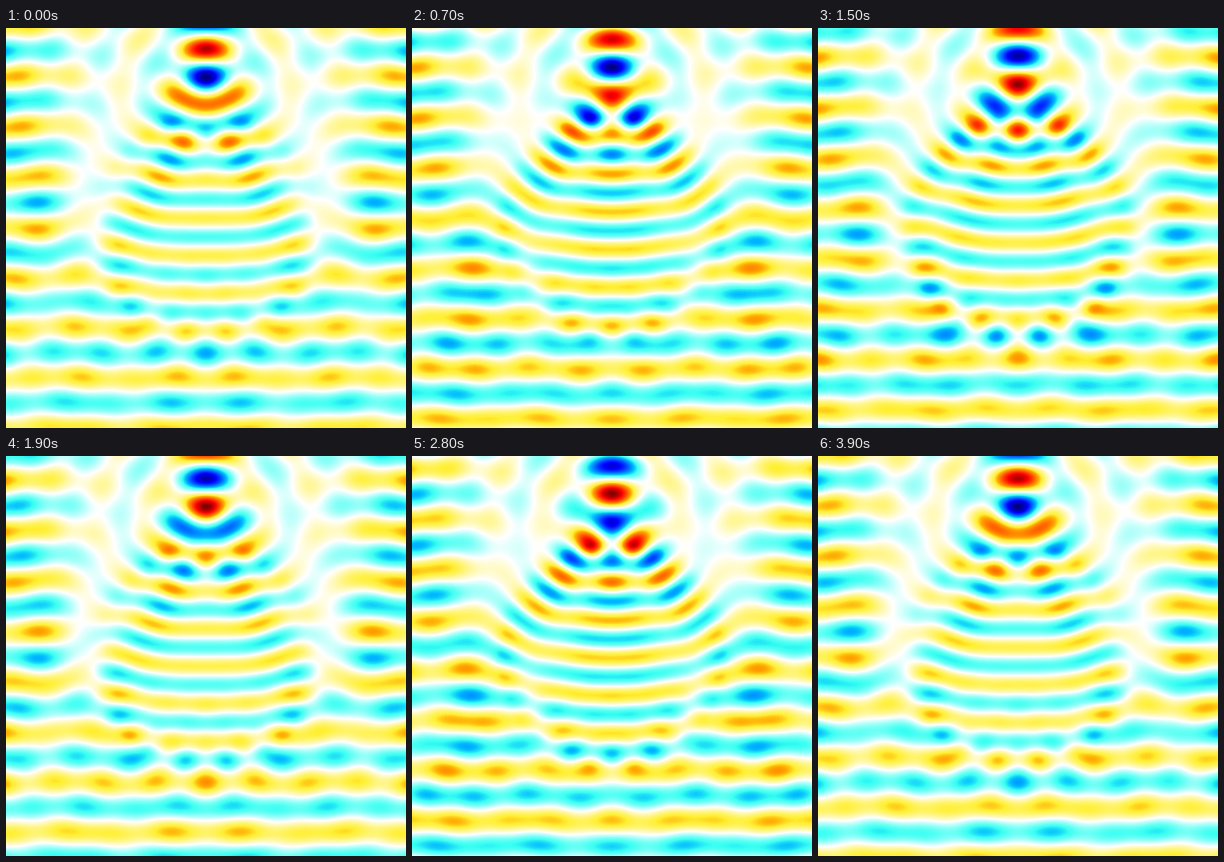
Recreate the animation shown at these times as a matplotlib script. Size 400 by 400 pixels, loop 4000 ms.

```python
import numpy as np
import matplotlib.pyplot as plt
from matplotlib.animation import FuncAnimation
from matplotlib.colors import LinearSegmentedColormap

# Plane wave travelling upwards through a dielectric cylinder,
# electric field along the cylinder axis.
SIZE = 400
FRAMES = 40
WAVELENGTH = 50.0
RADIUS = 115.0
INDEX = 1.33
ORDERS = 28
K = 2 * np.pi / WAVELENGTH


def bessel(x):
    """J_0..J_ORDERS by downward recurrence."""
    upper, current = np.zeros_like(x), np.full_like(x, 1e-60)
    values = [None] * (ORDERS + 1)
    norm = np.zeros_like(x)
    for n in range(60, -1, -1):
        if n % 2 == 0:
            norm += current * (2 if n else 1)
        if n <= ORDERS:
            values[n] = current
        upper, current = current, 2 * n / x * current - upper
    return [v / norm for v in values]


def hankel_start(order, x):
    """Large-argument expansion of the outgoing Hankel function."""
    term = np.ones(x.shape, complex)
    total = term.copy()
    for k in range(1, 17):
        term = term * 1j * (4 * order ** 2 - (2 * k - 1) ** 2) / (8 * k * x)
        total += term
    phase = x - order * np.pi / 2 - np.pi / 4
    return np.sqrt(2 / (np.pi * x)) * np.exp(1j * phase) * total


def hankel(x):
    """H_0..H_ORDERS by upward recurrence."""
    values = [hankel_start(0, x), hankel_start(1, x)]
    for n in range(1, ORDERS):
        values.append(2 * n / x * values[n] - values[n - 1])
    return values


def slope(f, n, x):
    return f[n - 1] - n / x * f[n] if n else -f[1]


def coefficients():
    """Scattered and internal amplitudes of each order."""
    x = np.array([K * RADIUS])
    mx = INDEX * x
    j, jm, h = bessel(x), bessel(mx), hankel(x)
    scattered, internal = [], []
    for n in range(ORDERS + 1):
        inner = INDEX * slope(jm, n, mx)
        bottom = jm[n] * slope(h, n, x) - inner * h[n]
        scattered.append((inner * j[n] - jm[n] * slope(j, n, x)) / bottom)
        internal.append(2j / (np.pi * x) / bottom)
    return scattered, internal


def series(weights, radial, angle):
    return sum((2 if n else 1) * 1j ** n * weights[n] * radial[n]
               * np.cos(n * angle) for n in range(ORDERS + 1))


def total_field():
    axis = np.arange(SIZE) - (SIZE - 1) / 2
    across, up = np.meshgrid(axis, -axis)
    r = np.hypot(across, up)
    angle = np.arctan2(across, up)
    inside = r < RADIUS
    outside = ~inside
    scattered, internal = coefficients()
    field = np.exp(1j * K * up)
    field[outside] += series(scattered, hankel(K * r[outside]), angle[outside])
    field[inside] = series(internal, bessel(INDEX * K * r[inside]), angle[inside])
    return field


def wave_colors(unit):
    """Colours from -1 to 1, where unit is the incident amplitude."""
    stops = [
        (-1, (0, 0, 0.5)), (-0.8, (0, 0, 1)), (-1.35 * unit, (0, 0.72, 1)),
        (-unit, (0.22, 1, 0.95)), (0, (1, 1, 1)), (unit, (1, 0.94, 0.2)),
        (1.35 * unit, (1, 0.65, 0)), (0.8, (1, 0, 0)), (1, (0.5, 0, 0))]
    return LinearSegmentedColormap.from_list(
        "wave", [((v + 1) / 2, color) for v, color in stops], N=256)


field = total_field()
peak = np.abs(field).max()

fig = plt.figure(figsize=(SIZE / 100, SIZE / 100), dpi=100)
ax = fig.add_axes([0, 0, 1, 1])
ax.axis("off")
image = ax.imshow(field.real, cmap=wave_colors(1 / peak), vmin=-peak,
                  vmax=peak, interpolation="nearest", aspect="auto")


def draw(i):
    image.set_data((field * np.exp(-2j * np.pi * i / FRAMES)).real)
    return [image]


anim = FuncAnimation(fig, draw, frames=FRAMES, interval=100,
                     repeat=True, repeat_delay=0)
plt.show()
```
